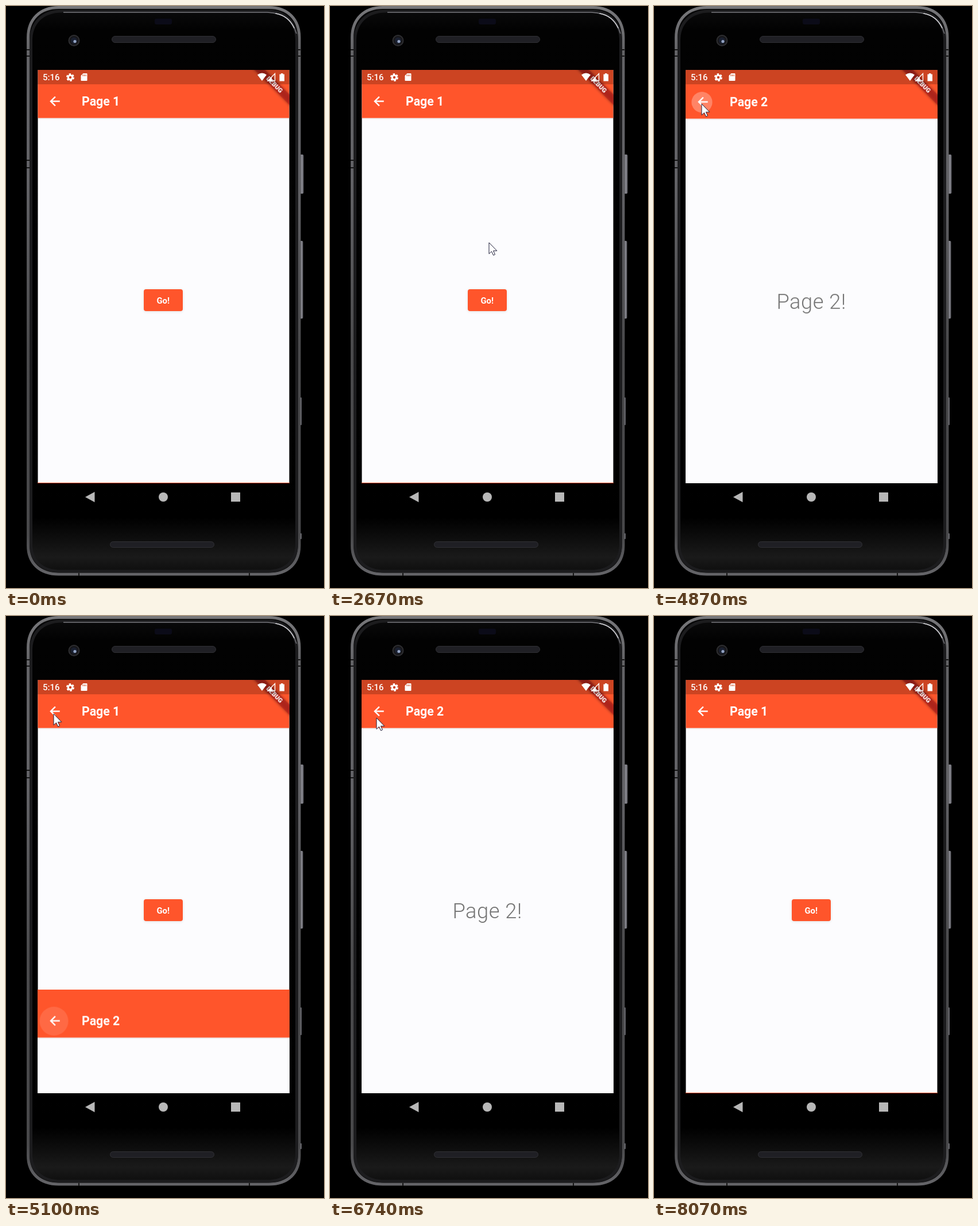
Write an HTML page that moves like this. It is 554 px wide and 1011 px high and loops after 8.75 s.

```html
<!DOCTYPE html>
<html lang="en">
<head>
<meta charset="utf-8">
<title>Page route transition</title>
<style>
  html, body { margin: 0; width: 100%; height: 100%; overflow: hidden; background: #000; }
  svg { display: block; width: 100vw; height: 100vh; font-family: Roboto, sans-serif; }
  .title { font-size: 21.3px; font-weight: 600; fill: #fff; }
  .ripple { fill: #fff; opacity: 0; }
</style>
</head>
<body>
<svg viewBox="0 0 554 1011">
  <defs>
    <linearGradient id="body" x2="0" y2="1">
      <stop offset="0" stop-color="#0b0b0c"/>
      <stop offset=".04" stop-color="#020202"/>
      <stop offset=".9" stop-color="#000"/>
      <stop offset=".97" stop-color="#1a1a1a"/>
      <stop offset="1" stop-color="#0c0c0c"/>
    </linearGradient>
    <linearGradient id="rim" x2="0" y2="1">
      <stop offset="0" stop-color="#77777a"/>
      <stop offset=".08" stop-color="#636366"/>
      <stop offset=".3" stop-color="#626266"/>
      <stop offset=".6" stop-color="#4a4a4c"/>
      <stop offset=".93" stop-color="#48484a"/>
      <stop offset="1" stop-color="#646468"/>
    </linearGradient>
    <linearGradient id="shade" x2="0" y2="1">
      <stop offset="0" stop-opacity=".09"/>
      <stop offset="1" stop-opacity="0"/>
    </linearGradient>
    <linearGradient id="side">
      <stop offset="0" stop-color="#48484c"/>
      <stop offset=".6" stop-color="#8c8c94"/>
      <stop offset="1" stop-color="#58585e"/>
    </linearGradient>
    <filter id="soft" x="-20%" y="-100%" width="140%" height="300%"><feGaussianBlur stdDeviation="2.5"/></filter>
    <clipPath id="screen"><rect x="55.500" y="111" width="438" height="717.300"/></clipPath>
    <clipPath id="buttonClip"><rect x="240" y="492" width="68" height="38" rx="4"/></clipPath>
    <g id="scaffold">
      <rect x="55" y="111" width="439" height="718" fill="#fcfcfe"/>
      <rect x="55" y="194.600" width="439" height="3" fill="url(#shade)"/>
      <rect x="55" y="111" width="439" height="83.600" fill="#ff552b"/>
      <path transform="translate(72.2 152.7) scale(1.066)" fill="#fff" stroke="#fff" stroke-width=".4"
        d="M20 11H7.83l5.59-5.59L12 4l-8 8 8 8 1.41-1.41L7.83 13H20z"/>
    </g>
  </defs>

  <!-- phone -->
  <g fill="url(#side)">
    <rect x="511" y="258" width="7.500" height="68" rx="2"/>
    <rect x="511" y="408" width="6.500" height="135" rx="2"/>
    <rect x="511" y="680" width="4" height="48" rx="1"/>
    <rect x="511" y="916" width="4" height="10" rx="1"/>
  </g>
  <path d="M38.500 55C38.500 23 59 2.500 92 2.500H458C491 2.500 511 23 511 55V937C511 968 491 987 458 987H92C59 987 38.500 968 38.500 937Z"
    fill="url(#body)" stroke="url(#rim)" stroke-width="5"/>
  <path d="M43.500 60C43.500 30 63 9 97 9H455C487 9 506.500 30 506.500 60V934C506.500 964 487 982 455 982H95C63 982 43.500 964 43.500 934Z"
    fill="none" stroke="#1c1c1e" stroke-width="5"/>
  <path d="M100 11H455C485 12 499 25 506 48" fill="none" stroke="#77777c" stroke-width="1.500"/>
  <path d="M470 13Q492 17 502 38" fill="none" stroke="#d0d0d4" stroke-width="1.600" stroke-linecap="round"/>
  <path d="M36 76h5M36 87h5M36 268h5M36 281h5M508 76h5M508 87h5M127 985v5M424 985v5" stroke="#151515" stroke-width="2"/>
  <rect x="259" y="22" width="30" height="10" rx="3" fill="#0b0b18"/>
  <g fill="#1f1f24" stroke="#303034">
    <rect x="184.500" y="52.500" width="181" height="11" rx="5.500"/>
    <rect x="181.500" y="930.500" width="181" height="10" rx="5"/>
  </g>
  <circle cx="118.500" cy="60" r="9" fill="#17171a" stroke="#2e2e31" stroke-width="2"/>
  <circle cx="118.500" cy="60" r="5.500" fill="#1a2030"/>
  <circle cx="120" cy="61.500" r="2.600" fill="#94a4c4"/>

  <!-- app -->
  <g clip-path="url(#screen)">
    <use href="#scaffold"/>
    <text class="title" x="132" y="173">Page 1</text>
    <rect x="240" y="493" width="68" height="38" rx="4" opacity=".1" filter="url(#soft)"/>
    <rect x="240" y="492" width="68" height="38" rx="4" fill="#ff552b"/>
    <g clip-path="url(#buttonClip)"><g transform="translate(275 510)"><circle id="goRipple" class="ripple" r="40"/></g></g>
    <text x="273.700" y="516.700" text-anchor="middle" font-size="14.900" font-weight="600" fill="#fff">Go!</text>

    <g id="page2">
      <use href="#scaffold"/>
      <g transform="translate(83.500 166)"><circle id="backRipple" class="ripple" r="25"/></g>
      <text class="title" x="132" y="173">Page 2</text>
      <text x="274" y="525" text-anchor="middle" font-size="36.300" font-weight="300" letter-spacing=".5" fill="#757575">Page 2!</text>
    </g>

    <!-- banner, then the system status bar over it -->
    <g transform="translate(493.500 111) rotate(45)">
      <rect x="-50" y="30" width="100" height="12.700" opacity=".4" filter="url(#soft)"/>
      <rect x="-50" y="30" width="100" height="12.700" fill="#b71c1c" opacity=".63"/>
      <text y="40.200" text-anchor="middle" font-size="10.900" font-weight="900" fill="#fff">DEBUG</text>
    </g>
    <rect x="55" y="111" width="439" height="25" opacity=".2"/>
    <g fill="#fff">
      <text x="64" y="129" font-size="15" font-weight="500">5:16</text>
      <g fill="none" stroke="#fff">
        <circle cx="112" cy="124" r="3.700" stroke-width="3"/>
        <circle cx="112" cy="124" r="5.800" stroke-width="2.400" stroke-dasharray="3.400 2.674"/>
      </g>
      <path d="M134.500 117H140.500Q141.500 117 141.500 118V129Q141.500 130 140.500 130H131.500Q130.500 130 130.500 129V121Z"/>
      <path d="M134 119v3M136.500 119v3M139 119v3" stroke="#cc461b"/>
      <path d="M438 119.500Q446 113.500 454 119.500L446 130Z"/>
      <path d="M468.500 117.500V130H456Z" fill="none" stroke="#fff" stroke-width="1.400"/>
      <path d="M463 123V130H456Z"/>
      <path d="M476.500 118.500H479V117H482.500V118.500H485V130.500H476.500Z"/>
    </g>
  </g>

  <!-- navigation bar -->
  <g fill="#b8b8b8">
    <path d="M138 853L154.500 844V862Z"/>
    <circle cx="274" cy="853" r="8"/>
    <rect x="392" y="845" width="16" height="16"/>
  </g>

  <path id="cursor" d="M0 0V19.500L4.500 15.300L7.600 22L10.500 20.700L7.500 14.200H13.800Z"
    fill="#fff" stroke="#1c1c38" stroke-linejoin="round"/>
</svg>
<script>
const LOOP = 8750, HEIGHT = 717;
const EASE_BACK = 'cubic-bezier(.75, 0, .75, .9)'; // "ease" run in reverse
const GLIDE = 'cubic-bezier(.4, 0, .3, 1)';
const move = (x, y) => ({ transform: `translate(${x}px, ${y}px)` });
const ripple = (scale, opacity) => ({ transform: `scale(${scale})`, opacity });

// rows: [time, values, easing to the next row]
function play(id, rows, toStyle) {
  const frames = rows.map(([time, values, easing = 'linear']) =>
    ({ offset: time / LOOP, easing, ...toStyle(...values) }));
  document.getElementById(id).animate(frames, { duration: LOOP, iterations: Infinity });
}

function pulses(starts, from) {
  const rows = starts.flatMap(start => [
    [start, [from, 0]],
    [start, [from, .28], 'ease-out'],
    [start + 130, [1, .25]],
    [start + 330, [1, 0]],
    [start + 330, [from, 0]]
  ]);
  return [[0, [from, 0]], ...rows, [LOOP, [from, 0]]];
}

const slides = [[3355, 4855], [5955, 7355]].flatMap(([push, pop]) => [
  [push, [0, HEIGHT], 'ease'], [push + 300, [0, 0]],
  [pop, [0, 0], EASE_BACK], [pop + 300, [0, HEIGHT]]
]);

play('page2', [[0, [0, HEIGHT]], ...slides, [LOOP, [0, HEIGHT]]], move);
play('goRipple', pulses([3300, 5900], .25), ripple);
play('backRipple', pulses([4870, 7370], .72), ripple);
play('cursor', [
  [0, [-30, 540]],
  [29, [-30, 540]],
  [30, [16, 530], 'ease-out'],
  [900, [292, 396]],
  [930, [292, 396], GLIDE],
  [1130, [284, 404]],
  [1930, [284, 404], GLIDE],
  [2100, [277, 410]],
  [2650, [277, 410]],
  [2670, [277, 411], GLIDE],
  [3000, [278, 520]],
  [3600, [278, 520], GLIDE],
  [4170, [95, 147]],
  [4200, [95, 147], GLIDE],
  [4370, [83, 170]],
  [5130, [83, 170], GLIDE],
  [5740, [275, 508]],
  [6180, [275, 508], GLIDE],
  [6740, [81, 177]],
  [6800, [81, 177], GLIDE],
  [7000, [83, 170]],
  [7560, [83, 170], 'cubic-bezier(.5, 0, .8, .7)'],
  [8070, [560, 0]],
  [LOOP, [560, 0]]
], move);
</script>
</body>
</html>
```
